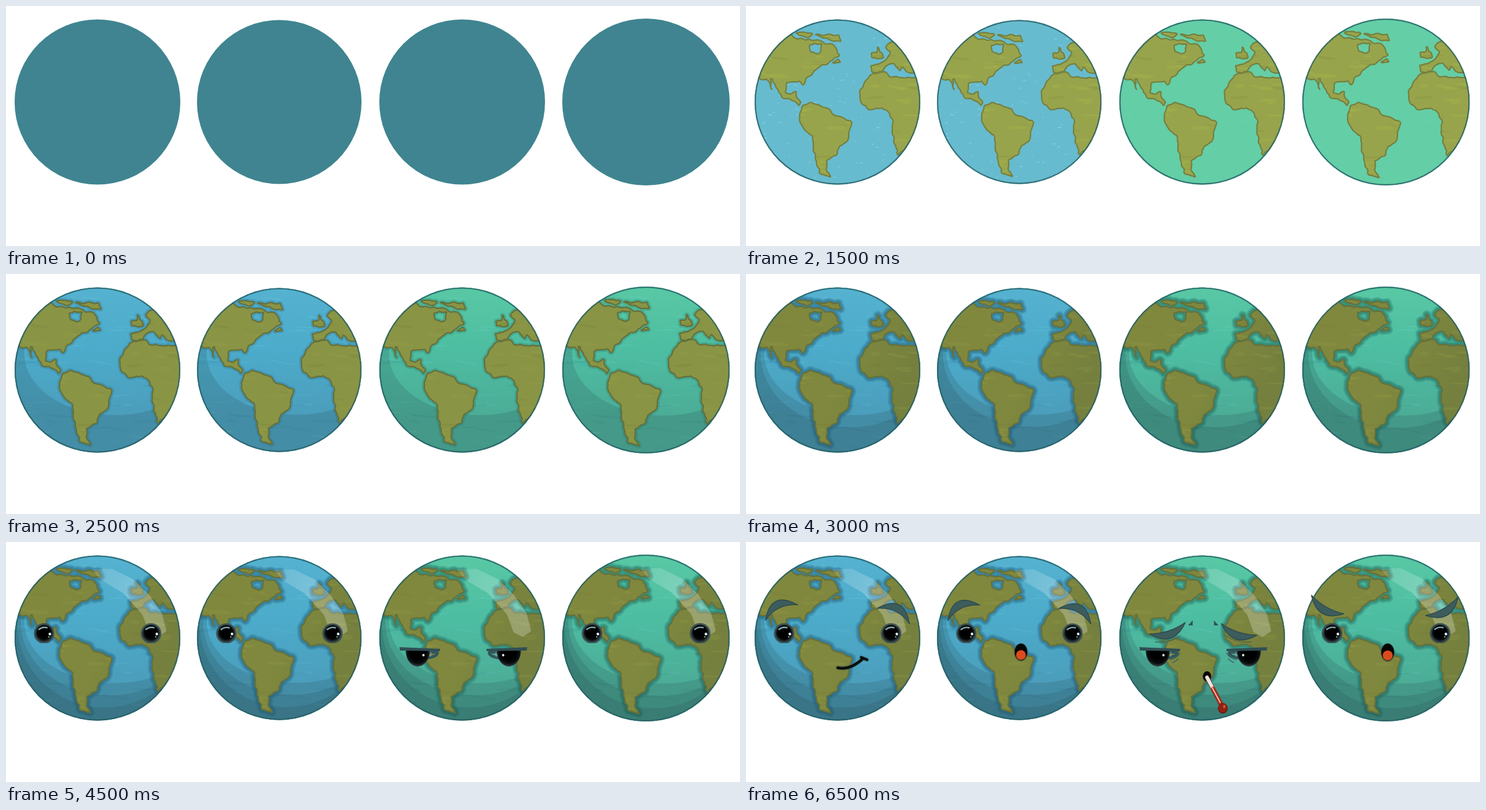
An HTML page with a canvas for the animation above (8 s loop, 1280 by 420 pixels).

```html
<!DOCTYPE html>
<html lang="en">
<head>
<meta charset="utf-8">
<title>Four globes</title>
<style>
html, body { margin: 0; width: 1280px; height: 420px; overflow: hidden; background: #fff; }
canvas { display: block; }
</style>
</head>
<body>
<canvas id="stage" width="1280" height="420"></canvas>
<script>
const ctx = document.getElementById('stage').getContext('2d');
const STEP = 500, LOOP = 8000, LAST = 13;
// All globes share the local coordinates of the first one.
const CX = 159.5, CY = 168, R = 144.5;

const BLUE = { flat: '#61b9cb', dotted: '#67bbcf', deep: ['#55b2d0', '#4cabca', '#4b9dbb'], dot: 'rgba(160,222,232,.4)', coast: '32,86,110' };
const GREEN = { flat: '#63c89f', dotted: '#64cea6', deep: ['#58c8a4', '#4dbda2', '#4cac96'], dot: 'rgba(60,170,150,.12)', coast: '28,92,82' };
const globes = [
  { x: 159.5, r: 144.5, sea: BLUE, face: happy },
  { x: 476.5, r: 143.5, sea: BLUE, face: surprised },
  { x: 795.5, r: 144.5, sea: GREEN, face: sick },
  { x: 1116, r: 146, sea: GREEN, face: angry }
];

const random = i => { const v = Math.sin(i * 127.1 + 3.7) * 43758.5453; return v - Math.floor(v); };
const mix = (a, b, t) => a + (b - a) * t;

// Closed smooth outline through a few key points; roughness adds small bays and capes.
function blob(text, rough = 0, path = new Path2D()) {
  const keys = text.split(' ').map(p => p.split(',').map(Number));
  const points = keys.flatMap(([x, y], i) => {
    const [u, v] = keys[(i + 1) % keys.length];
    const length = Math.hypot(u - x, v - y), parts = Math.max(2, Math.round(length / 5));
    return Array.from({ length: parts }, (_, k) => {
      const push = k ? rough * Math.min(1, length / 20) * (random(x + y + k) * 2 - 1) / length : 0;
      return [mix(x, u, k / parts) + (v - y) * push, mix(y, v, k / parts) - (u - x) * push];
    });
  });
  const mid = (a, b) => [mix(a[0], b[0], .5), mix(a[1], b[1], .5)];
  path.moveTo(...mid(points[points.length - 1], points[0]));
  points.forEach((p, i) => path.quadraticCurveTo(...p, ...mid(p, points[(i + 1) % points.length])));
  path.closePath();
  return path;
}

// Sickle between two points; the bulges are the heights of its two edges.
function sickle(x0, y0, x1, y1, outer, inner) {
  const length = Math.hypot(x1 - x0, y1 - y0);
  const control = h => `${(x0 + x1) / 2 + (y1 - y0) / length * h * 2} ${(y0 + y1) / 2 - (x1 - x0) / length * h * 2}`;
  return new Path2D(`M${x0} ${y0}Q${control(outer)} ${x1} ${y1}Q${control(inner)} ${x0} ${y0}Z`);
}

const land = new Path2D();
[
  // North and Central America, then Hudson Bay as a hole
  '8,124 30,80 76,48 90,58 128,60 138,67 152,67 164,86 146,97 118,114 104,128 100,139 94,131 70,135 68,152 78,155 88,149 88,160 96,168 92,175 76,162 62,160 52,143 46,127 42,128 46,147 36,128',
  '110,68 133,66 131,80 123,84 112,80',
  // Arctic islands and Newfoundland
  '87,47 104,46 117,49 110,55 96,52',
  '120,50 162,50 166,62 152,62 140,56',
  '150,99 161,93 165,99',
  // South America
  '98,174 112,168 122,172 132,176 147,181 153,191 168,195 185,203 179,221 176,238 163,245 157,262 140,270 140,288 148,300 130,295 123,272 117,245 115,226 104,219 93,200 96,184',
  // Africa
  '215,122 232,116 244,115 249,123 272,125 318,130 320,200 266,262 255,225 257,203 248,185 237,178 214,182 200,167 198,150',
  // Europe and the British Isles
  '217,104 231,102 248,88 252,80 243,72 250,64 266,58 310,110 300,119 284,117 272,106 269,114 259,101 244,105 238,115 219,116',
  '229,71 240,91 219,91 218,82 228,82'
].forEach(keys => blob(keys, 2.4, land));

const shine = blob('150,48 185,47 222,65 250,93 272,125 280,156 265,166 249,158 238,127 205,90 165,66');
const archBrow = sickle(34, 137, 90, 110, 22, 9);
const fierceBrow = sickle(31, 94, 87, 126, -18, -5);
const sadBrow = sickle(68, 161, 130, 141, -18, -5);

function fill(path, color) { ctx.fillStyle = color; ctx.fill(path, 'evenodd'); }

function oval(x, y, rx, ry, color, angle = 0, end = 7) {
  ctx.beginPath();
  ctx.ellipse(x, y, rx, ry, angle, 0, end);
  ctx.fillStyle = color;
  ctx.fill();
}

function outline(path, color, width) {
  ctx.strokeStyle = color;
  ctx.lineWidth = width;
  ctx.stroke(path);
}

const line = (d, color, width) => outline(new Path2D(d), color, width);

function shade(gradient, colors) {
  colors.forEach((c, i) => gradient.addColorStop(i / (colors.length - 1), c));
  return gradient;
}

const linear = (x0, y0, x1, y1, colors) => shade(ctx.createLinearGradient(x0, y0, x1, y1), colors);
const radial = (x, y, r, colors) => shade(ctx.createRadialGradient(x, y - 3, r / 2, x, y, r), colors);

// Draws a shape and its reflection, the latter lowered by dy.
function pair(axis, dy, draw) {
  draw();
  ctx.save();
  ctx.translate(2 * axis, dy);
  ctx.scale(-1, 1);
  draw();
  ctx.restore();
}

function streaks(count, seed, length, height, color) {
  for (let i = 0; i < count; i++) {
    const r = k => random(seed + i * 5 + k);
    oval(15 + r(0) * 290, 25 + r(1) * 285, length * (.4 + r(2)), height * (.4 + r(3)), color, r(4) * .3 - .1);
  }
}

// Shades everything below and left of a lit bowl.
function band(cx, rx, ry) {
  const p = new Path2D();
  p.rect(0, 0, 330, 330);
  p.moveTo(cx - rx, 0);
  p.ellipse(cx, 140, rx, ry, 0, Math.PI, 0, true);
  p.lineTo(cx + rx, 0);
  fill(p, 'rgba(35,70,75,.18)');
}

function drawSea(sea, s) {
  ctx.fillStyle = s < 2 ? sea.flat : s < 4 ? sea.dotted : linear(0, 24, 0, 250, sea.deep);
  ctx.fillRect(0, 0, 330, 330);
  if (s === 2 || s === 3) streaks(170, 900, 2.6, 1, sea.dot);
  if (s >= 4) {
    streaks(40, 50, 20, 1.6, 'rgba(125,220,225,.12)');
    streaks(26, 400, 20, 1.5, 'rgba(25,90,125,.08)');
  }
  for (let i = 0; i < Math.min(3, s - 4); i++) band(190 - 9 * i, 158 - 2.5 * i, 107 + 21.5 * i);
}

function drawLand(sea, s) {
  const glow = s < 4 ? [] : s < 6 ? [8] : [8, 11, 15];
  glow.forEach(width => outline(land, `rgba(${sea.coast},.2)`, width));
  fill(land, s < 2 ? '#a3c965' : s < 3 ? '#9fb052' : s < 5 ? '#98a44c' : s < 6 ? '#899445'
    : linear(70, 110, 280, 190, ['#80883e', '#7f883e', '#75803e']));
  if (s >= 2) {
    ctx.save();
    ctx.clip(land, 'evenodd');
    streaks(65, 1300, 16, 2.5, s < 5 ? 'rgba(168,184,72,.3)' : 'rgba(160,168,70,.17)');
    streaks(35, 2100, 14, 2, 'rgba(110,112,50,.13)');
    ctx.restore();
  }
  if (s >= 3) outline(land, s < 5 ? '#75803f' : '#667039', 2.4);
}

function eye(x, s) {
  const y = 160;
  ctx.save();
  ctx.beginPath();
  ctx.rect(x - 20, y - 20, 40, 37);
  ctx.clip();
  oval(x, y, 18, 18, 'rgba(55,78,82,.85)');
  oval(x, y, 16, 16, radial(x, y, 16, ['#000', '#050809', '#3c4c52']));
  ctx.restore();
  if (s < 9) return;
  line(`M${x - 9} ${y - 7}Q${x - 3} ${y - 12} ${x + 5} ${y - 10}`, '#86a6a8', 2.6);
  oval(x + 10, y + 1, 2.3, 2.5, '#e4efef');
  oval(x + 8, y + 6, 1.3, 1.3, '#8ea9ab');
}

function roundEyes(s) { [66.5, 253].forEach(x => eye(x, s)); }

function brows(path, axis, dy) {
  pair(axis, dy, () => {
    fill(path, '#3c5c5d');
    outline(path, '#304c4c', 1.6);
  });
}

function openMouth(s) {
  if (s >= 11) oval(162.5, 193, 12, 16, 'rgba(45,62,52,.65)');
  if (s < 12) return;
  oval(162.5, 192.5, 10.8, 14.5, '#050505');
  oval(162.5, 198, 8.6, 8.5, '#db4b1e');
}

function happy(s) {
  roundEyes(s);
  if (s >= 10) brows(archBrow, CX, 6);
  const smile = 'M160 220C177 224 192 215 204 204M201 202L211 206';
  if (s >= 11) line(smile, 'rgba(35,65,65,.45)', 7);
  if (s >= 12) line(smile, '#0a0e0d', 4.5);
}

function surprised(s) {
  roundEyes(s);
  if (s >= 10) brows(archBrow, CX, 6);
  openMouth(s);
}

function angry(s) {
  roundEyes(s);
  if (s >= 10) brows(fierceBrow, 157.5, 3);
  openMouth(s);
}

function sick(s) {
  const axis = 161.5;
  pair(axis, 0, () => {
    line('M80 193H116Q118 200 98 203', '#31575b', 5);
    oval(82, 190, 21, 28, radial(82, 196, 24, ['#000', '#0a0e0f', '#4a585e']), 0, Math.PI);
    fill(new Path2D('M50 184L121 187V191L51 190Z'), '#304f54');
    if (s < 9) return;
    oval(92, 198, 2, 2.2, '#dce9e7');
    line('M104 193Q107 196 104 200', '#7b9b9c', 1.5);
  });
  if (s < 10) return;
  brows(sadBrow, axis, 2);
  pair(axis, 0, () => {
    fill(new Path2D('M143 137V146H135Z'), '#305758');
    line('M78 175Q105 177 122 164', '#4e633f', 1.5);
    line('M104 206Q117 203 121 194M108 211Q114 209 118 204', '#3d6360', 1.5);
  });
  oval(168, 235.5, 7.7, 9.5, '#3d4332');
  if (s >= 12) oval(168, 235, 6.8, 8.5, '#050505');
  if (s >= 13) thermometer();
}

function thermometer() {
  line('M168 237L194 287', '#5d2b22', 8);
  line('M168 237L178 256', '#e9e5e1', 6);
  line('M178 256L194 287', '#c22b17', 6);
  line('M176 253L191 281', '#e8d8d0', 1.6);
  oval(195.5, 291, 8.5, 9.2, '#5f1b12');
  oval(195.5, 290.5, 7.3, 8, '#94200f');
  oval(198, 288, 2, 3, '#bd5946');
}

function drawGlobe({ x, r, sea, face }, s) {
  const disc = new Path2D();
  disc.arc(CX, CY, R, 0, 7);
  ctx.save();
  ctx.translate(x, CY);
  ctx.scale(r / R, r / R);
  ctx.translate(-CX, -CY);
  fill(disc, '#3f8490');
  if (s > 0) {
    ctx.save();
    ctx.clip(disc);
    drawSea(sea, s);
    drawLand(sea, s);
    if (s >= 7) fill(shine, linear(150, 45, 265, 165, ['rgba(255,255,255,.12)', 'rgba(255,255,255,.25)', 'rgba(255,255,255,.24)']));
    outline(disc, s < 3 ? '#3f8490' : 'rgba(38,95,100,.8)', 4.5);
    ctx.restore();
    if (s >= 8) face(s);
  }
  ctx.restore();
}

ctx.lineJoin = ctx.lineCap = 'round';
let shown = -1;
function frame() {
  const step = Math.min(LAST, Math.floor(performance.now() % LOOP / STEP));
  if (step !== shown) {
    shown = step;
    ctx.clearRect(0, 0, 1280, 420);
    globes.forEach(g => drawGlobe(g, step));
  }
  requestAnimationFrame(frame);
}
frame();
</script>
</body>
</html>
```
